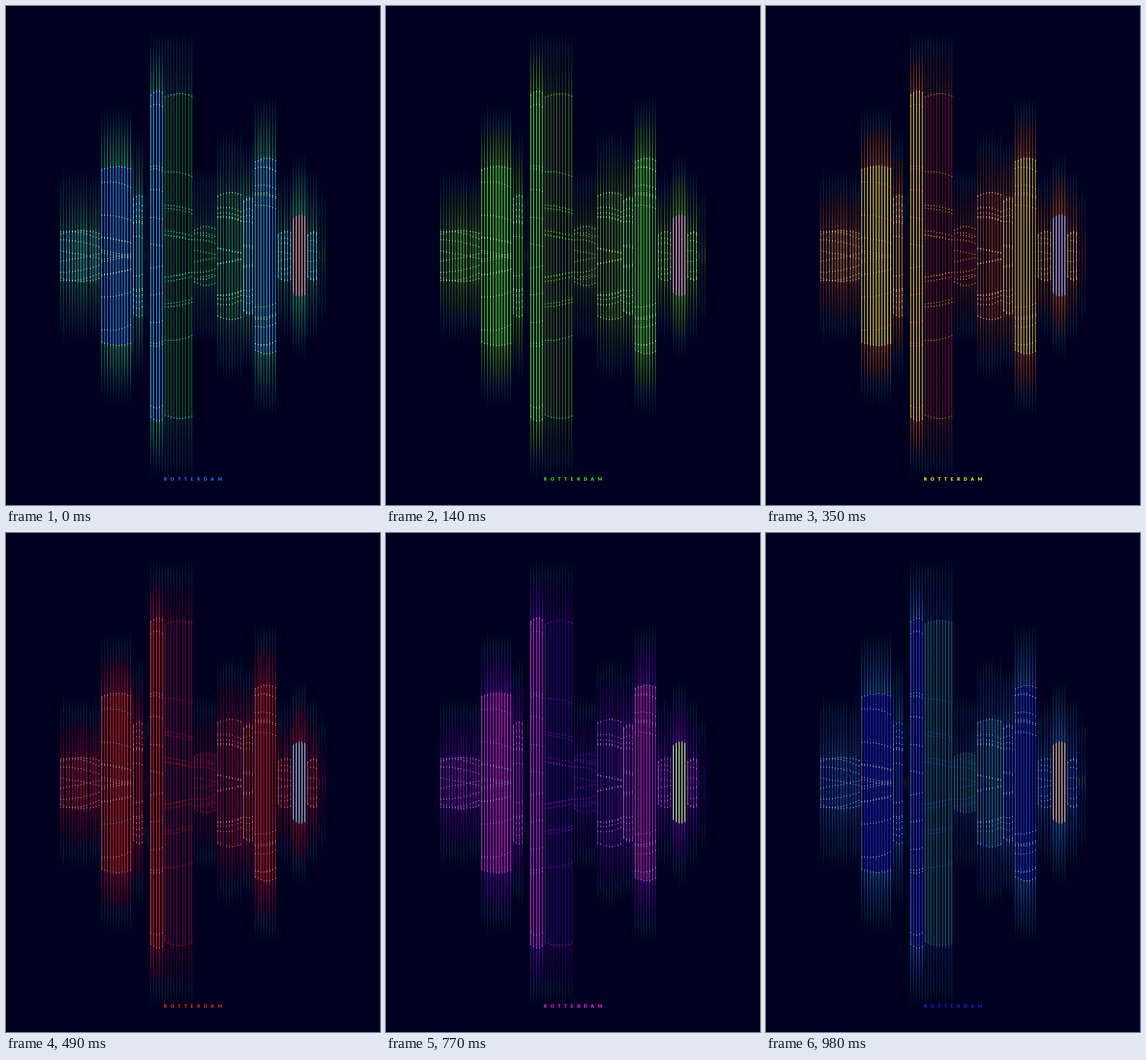
Animation of 648x864 px, one loop 1050 ms. Source, as an HTML page with a canvas:

```html
<!DOCTYPE html>
<html lang="en">
<head>
<meta charset="utf-8">
<title>Rotterdam</title>
<style>
html, body { margin: 0; height: 100%; overflow: hidden; background: #000020; }
canvas { display: block; }
</style>
</head>
<body>
<canvas id="stage" width="648" height="864"></canvas>
<script>
const ctx = document.getElementById('stage').getContext('2d');
const MID = 432, COUNT = 92, FADE = 106, STEP = 70, STEPS = 15;

// Colour cycle: step and hue
const HUES = [[0, 213], [2, 113], [4, 85], [7, 5], [9, -20], [12, -80], [15, -147]];

// Blocks of bars: first bar, half-height of the bright core, brightness
const BLOCKS = [
  [0, 38, .72], [14, 149, .95], [25, 99, .82], [29, 4, .2], [31, 279, .9],
  [36, 275, .42], [46, 45, .42], [54, 104, .55], [63, 95, .8], [67, 163, .9],
  [75, 36, .75], [80, 64, 1], [85, 36, .75], [89, 6, .35]
];

const lerp = (a, b, k) => a + (b - a) * k;
const random = seed => Math.abs(Math.sin(seed * 12.9898) * 43758.5453) % 1;

function hue(phase) {
  const turns = Math.floor(phase / STEPS), p = phase - turns * STEPS;
  const j = HUES.findIndex(([at]) => at > p);
  const [p0, h0] = HUES[j - 1], [p1, h1] = HUES[j];
  return lerp(h0, h1, (p - p0) / (p1 - p0)) - 360 * turns;
}

const color = (phase, light, alpha) => `hsla(${hue(phase)}, 100%, ${light}%, ${alpha})`;

const bars = BLOCKS.flatMap(([first, core, level], b) => {
  const size = (BLOCKS[b + 1]?.[0] ?? COUNT) - first;
  return Array.from({ length: size }, (_, j) => {
    const white = level === 1, i = first + j;
    return {
      x: Math.round(94.2 + 5.03 * i),
      core: core + 6 * Math.sin(Math.PI * j / size),
      reach: FADE + 16 * (random(i) - .5),
      power: white ? 1 : level * lerp(.8, 1.1, random(i + 50)),
      phase: white ? 7.6 : 3.2 * (1 - level),
      light: white ? 86 : j ? 52 : 66,
      slope: j - size / 2,
      block: b
    };
  });
});

function drawBar({ x, core, reach, power, phase, light }, step) {
  const tail = core + reach;
  const glow = ctx.createLinearGradient(0, MID - tail, 0, MID + tail);
  const stop = (d, c) => {
    glow.addColorStop(.5 - d / tail / 2, c);
    glow.addColorStop(.5 + d / tail / 2, c);
  };
  const outer = step + 1.2;
  stop(0, color(step + phase, light, power));
  stop(core, color(step + phase, light, power));
  stop(core + 2, color(outer, 48, power * .75));
  stop(core + reach * .45, color(outer, 44, power * .45));
  stop(core + reach * .75, 'hsla(182, 100%, 36%, .2)');
  stop(tail, 'hsla(182, 100%, 36%, 0)');
  ctx.fillStyle = glow;
  ctx.fillRect(x, MID - tail, 1.5, tail * 2);
}

// Small lit marks: one on the core's edge, the rest in slanted rows
function drawMarks({ x, core, power, slope, block }, step) {
  if (power === 1 || core < 30) return;
  ctx.fillStyle = color(step + 1, power < .5 ? 48 : 70, .7);
  const rows = Math.min(7, core / 12);
  for (let r = 0; r < rows; r++) {
    const d = r ? core * random(block * 9 + r) - slope : core;
    for (const y of [MID - d, MID + d]) ctx.fillRect(x, Math.round(y), 2, 2);
  }
}

function draw(now) {
  const step = Math.floor(now / STEP) % STEPS;
  ctx.fillStyle = '#000020';
  ctx.fillRect(0, 0, 648, 864);
  for (const bar of bars) {
    drawBar(bar, step);
    drawMarks(bar, step);
  }
  ctx.font = '900 8px Lato, sans-serif';
  ctx.letterSpacing = '6.35px';
  ctx.fillStyle = color(step, 53, 1);
  ctx.fillText('ROTTERDAM', 273.4, 822.4);
}

let start;
function tick(now) {
  start ??= now;
  draw(now - start);
  requestAnimationFrame(tick);
}
draw(0);
requestAnimationFrame(tick);
</script>
</body>
</html>
```
